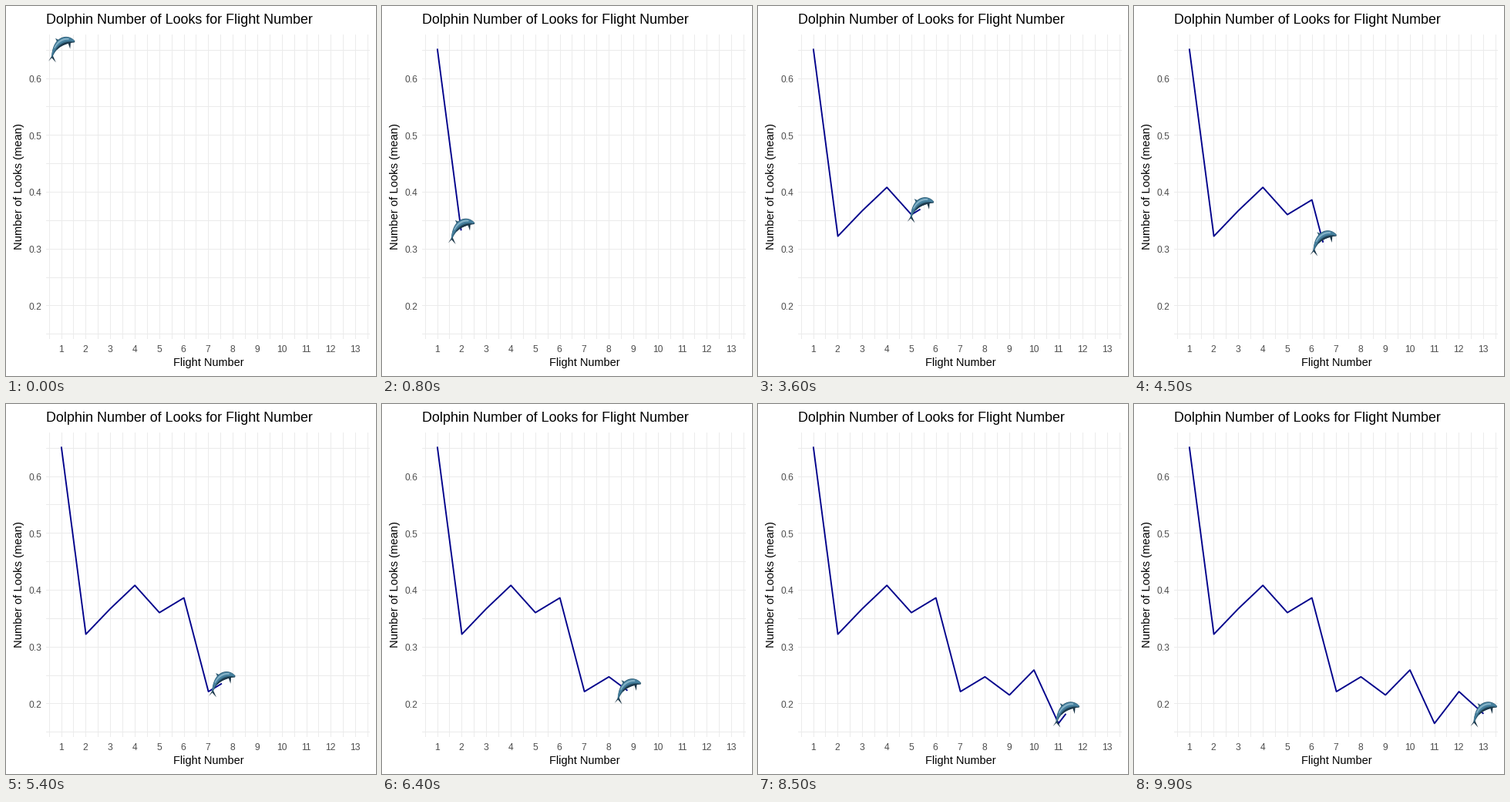
Recreate the animation shown at these times as a matplotlib script. Size 480 px wide and 480 px high, loop 10 s.

```python
import numpy as np
import matplotlib.pyplot as plt
from matplotlib.animation import FuncAnimation
from matplotlib.patches import Polygon
from matplotlib.transforms import Affine2D

SIZE, DPI, FRAMES = 480, 100, 100
PX = 72 / DPI  # points per pixel
DARK, DEEP, BLUE, LIGHT = "#1B3547", "#2B5870", "#46809E", "#86B3C8"

plt.rcParams["font.family"] = "Liberation Sans"

flights = np.arange(1, 14)
means = np.array([0.653, 0.323, 0.368, 0.409, 0.361, 0.387, 0.222,
                  0.248, 0.216, 0.260, 0.166, 0.222, 0.183])


def px(flight):
    return 71.6 + 31.8 * (flight - 1)


def py(mean):
    return 94 + (0.6 - mean) * 737


fig = plt.figure(figsize=(SIZE / DPI, SIZE / DPI), dpi=DPI, facecolor="white")
ax = fig.add_axes([0, 0, 1, 1])
ax.set_xlim(0, SIZE)
ax.set_ylim(SIZE, 0)
ax.axis("off")


def rule(xs, ys):
    ax.plot(xs, ys, color="#EBEBEB", lw=PX, solid_capstyle="butt",
            snap=False, zorder=1)


def label(x, y, text, size, color="black", **kw):
    kw.setdefault("va", "baseline")
    ax.text(x, y, text, fontsize=size * PX, color=color, **kw)


for v in np.arange(0.5, 13.6, 0.5):
    x = np.floor(px(v) + 0.49) + 0.5
    rule([x, x], [37, 432])
for v in np.arange(0.15, 0.66, 0.05):
    y = np.floor(py(v) + 0.1) + 0.5
    rule([52, 472], [y, y])

for n in flights:
    label(px(n) - 0.4, 449, str(n), 12, "#4D4D4D", ha="center")
for v in np.arange(0.2, 0.61, 0.1):
    label(46.5, py(v) + 5, f"{v:.1f}", 12, "#4D4D4D", ha="right")

label(52, 23, "Dolphin Number of Looks for Flight Number", 17.9)
label(262.7, 467, "Flight Number", 14.5, ha="center")
label(24, 234.5, "Number of Looks (mean)", 14.8, ha="right",
      va="center", rotation=90)

line, = ax.plot([], [], color="#00008B", lw=1.9 * PX, solid_capstyle="butt",
                solid_joinstyle="round", zorder=2)

dolphin = []


def spine(t):
    """Bezier curve from the tail to the beak, around the dolphin's centre."""
    t = np.asarray(t)[..., None]
    tail, back, head, beak = np.array([(-12.8, 11), (-9, -8), (4, -16),
                                       (17, -9.8)])
    s = 1 - t
    return (s**3 * tail + 3 * s**2 * t * back + 3 * s * t**2 * head
            + t**3 * beak)


def shape(points, color):
    dolphin.append(ax.add_patch(Polygon(points, fc=color, ec="none",
                                        zorder=3)))


def fin(t0, t1, tip, color):
    shape([*spine([t0, t1]), tip], color)


def band(lo, hi, color, t0=0, t1=1):
    """Strip of the body; -1 is the back edge and 1 the belly edge."""
    t = np.linspace(t0, t1, 40)
    mid = spine(t)
    d = np.gradient(mid, axis=0)
    normal = np.column_stack([-d[:, 1], d[:, 0]])
    normal /= np.hypot(*d.T)[:, None]
    half = (0.8 + 22.6 * t**1.5 * (1 - t))[:, None]
    shape(np.vstack([mid + lo * half * normal,
                     (mid + hi * half * normal)[::-1]]), color)


fin(0, 0.07, (-17.2, 15.5), DARK)
fin(0, 0.07, (-7.4, 17), DARK)
fin(0.4, 0.56, (-8.2, -14.4), DEEP)
fin(0.74, 0.87, (11, -0.6), DARK)
band(-1, 1, DEEP)
band(-0.85, 0.35, BLUE, 0.05, 0.97)
band(-0.6, -0.15, LIGHT, 0.25, 0.8)
band(0.6, 1, DARK, 0.25)


def draw(i):
    now = 1 + 12 * i / (FRAMES - 1)
    path = np.append(flights[flights < now], now)
    ys = py(np.interp(path, flights, means))
    line.set_data(px(path) + 0.2, ys + 0.5)
    shift = Affine2D().translate(px(now) + 0.6, ys[-1] + 1.3)
    for part in dolphin:
        part.set_transform(shift + ax.transData)
    return [line, *dolphin]


anim = FuncAnimation(fig, draw, frames=FRAMES, interval=100,
                     init_func=lambda: draw(0), repeat=True, repeat_delay=0)
plt.show()
```
